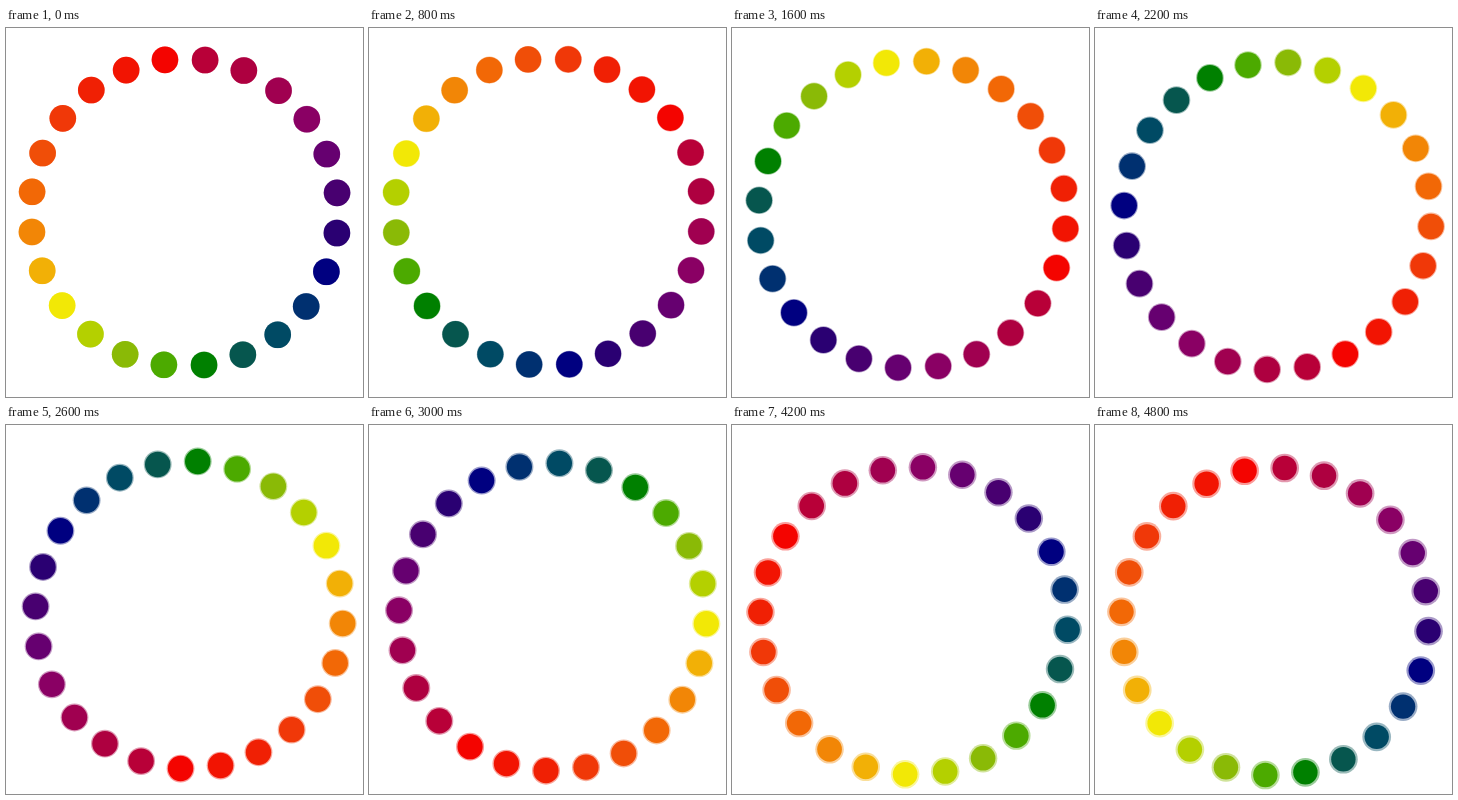
Write an HTML page with a canvas that moves like this. It is 357 px wide and 369 px high and loops after 5000 ms.

```html
<!DOCTYPE html>
<html lang="en">
<head>
<meta charset="utf-8">
<title>Colour wheel</title>
<style>
  html, body { margin: 0; width: 100%; height: 100%; overflow: hidden; background: #fff; }
  canvas { display: block; }
</style>
</head>
<body>
<canvas id="stage" width="357" height="369"></canvas>
<script>
const ctx = document.getElementById('stage').getContext('2d');
const STEP = 200, STEPS = 25, RADIUS = 153.8;

// Clockwise, starting with the red just left of the top
const colors = ('f40400 b80038 ae0040 a00050 8a0064 660070 480070 2a0072 ' +
  '000080 003070 004a64 06564e 008000 4caa00 8aba06 b4d000 ' +
  'f2e806 f2b006 f28606 f26806 f04e08 f03808 f02004 f21402').split(' ');

// The ring drifts as it turns: step, centre x, centre y, angle offset in degrees
const drift = [
  [0, 178, 183.9, -7.3],
  [4, 179.2, 183.4, -7.7],
  [8, 179.8, 186, -9.7],
  [11, 182.1, 187.5, -11.1],
  [15, 183.2, 191.5, -12.5],
  [18, 183.3, 193.6, -12.3],
  [21, 181.5, 195.3, -11.7],
  [24, 179.5, 196, -11.4]
];

function pose(step) {
  let i = 0;
  while (i < drift.length - 2 && drift[i + 1][0] <= step) i++;
  const a = drift[i], b = drift[i + 1];
  const k = (step - a[0]) / (b[0] - a[0]);
  return a.map((v, j) => v + (b[j] - v) * k).slice(1);
}

function disc(x, y, r, alpha) {
  ctx.globalAlpha = alpha;
  ctx.beginPath();
  ctx.arc(x, y, r, 0, Math.PI * 2);
  ctx.fill();
}

function draw(now) {
  const step = Math.floor(now / STEP) % STEPS;
  const [cx, cy, offset] = pose(step);
  ctx.clearRect(0, 0, 357, 369);
  colors.forEach((color, i) => {
    const a = ((i + step) * 15 + offset) * Math.PI / 180;
    const x = cx + RADIUS * Math.sin(a) + 0.5;
    const y = cy - RADIUS * Math.cos(a) + 0.5;
    ctx.fillStyle = '#' + color;
    // Edges soften as the turn goes on
    disc(x, y, 13.4 + step * 0.04, 0.4);
    disc(x, y, 13.3 - step * 0.045, 1);
  });
  requestAnimationFrame(draw);
}
requestAnimationFrame(draw);
</script>
</body>
</html>
```
